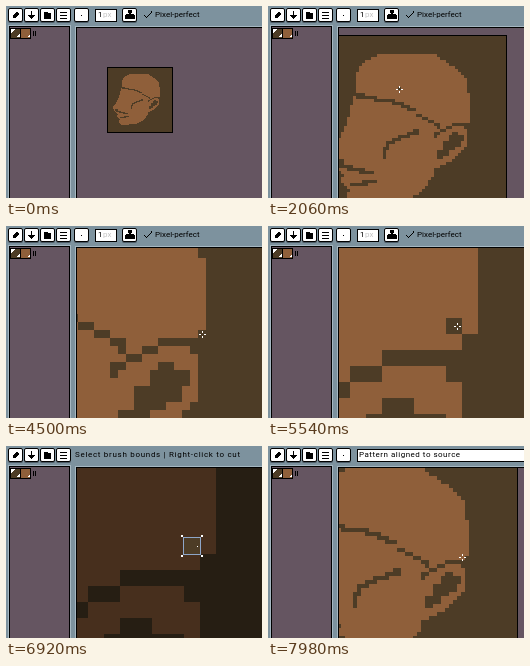
Write an HTML page with a canvas that moves like this. It is 256 px wide and 192 px high and loops after 8 s.

```html
<!DOCTYPE html>
<html lang="en">
<head>
<meta charset="utf-8">
<title>Pixel editor</title>
<style>
  html, body { margin: 0; width: 100%; height: 100%; overflow: hidden; background: #7d929e; }
  #stage { position: absolute; left: 0; top: 0; width: 256px; height: 192px; overflow: hidden;
    background: #7d929e; font: 8px/10px Roboto, sans-serif; color: #000; }
  #stage *, #stage { box-sizing: border-box; }
  #stage div, #stage span, #stage svg, canvas { position: absolute; }
  canvas { left: 71px; top: 22px; image-rendering: pixelated; }
  .panel { top: 20px; height: 180px; background: #655561; border: 1px solid #000;
    box-shadow: 0 0 0 1px #a5b7c1; }
  .btn { top: 2px; width: 15px; height: 14px; background: #fff; border: 1px solid #000;
    border-radius: 2px; box-shadow: 0 1px #4b5a66; }
  .field { top: 3px; height: 13px; background: #fff; border: 1px solid #000; }
  #stage span { top: 4px; white-space: pre; }
  .bar { left: 0; top: 0; width: 256px; height: 18px; }
  .hint { left: 69px; letter-spacing: .7px; }
  .combo { left: 91px; letter-spacing: .5px; }
  svg { left: 0; top: 0; }
</style>
</head>
<body>
<div id="stage">
  <div class="btn" style="left:2px"></div>
  <div class="btn" style="left:18px"></div>
  <div class="btn" style="left:34px"></div>
  <div class="btn" style="left:50px"></div>
  <svg width="66" height="18" shape-rendering="crispEdges">
    <path d="M10 6h2v1h1v2h-1v1h-1v1h-1v1H7V9h1V8h1V7h1z"/>
    <path d="M25 5h1v4h3v1h-1v1h-1v1h-1v1h-1v-1h-1v-1h-1v-1h-1V9h3z"/>
    <path d="M38 6h4v1h3v6h-7z"/>
    <path d="M54 6h7v1h-7zM54 9h7v1h-7zM54 12h7v1h-7z"/>
  </svg>

  <div class="bar" data-bar="tool">
    <div class="btn" style="left:68px"></div>
    <div class="field" style="left:89px;width:22px"></div>
    <div class="btn" style="left:116px"></div>
    <svg width="150" height="18" shape-rendering="crispEdges">
      <path d="M75 9h1v1h-1z"/>
      <path d="M122 4h4v3h-1v1h3v1h1v4h-10V9h1V8h3V7h-1z"/>
      <path d="M145 5h1v2h-1v1h-1v1h-1v1h-1v1h-1v1h-1v-1h-1v-1h-1V9h1v1h1v1h1v-1h1V9h1V8h1V7h1z"/>
    </svg>
    <span style="left:92px">1</span>
    <span style="left:97px;color:#c5c5c5">px</span>
    <span style="left:149px">Pixel-perfect</span>
  </div>
  <div class="bar" data-bar="hint"><span class="hint">Select brush bounds | Right-click to cut</span></div>
  <div class="bar" data-bar="pattern">
    <div class="btn" style="left:68px"></div>
    <svg width="90" height="18"><path d="M75 9h1v1h-1z"/></svg>
    <div class="field" style="left:89px;width:170px"></div>
    <span class="combo">Pattern aligned to source</span>
  </div>

  <div class="panel" style="left:3px;width:61px"></div>
  <div class="panel" style="left:70px;top:21px;width:190px"></div>
  <svg width="40" height="40" shape-rendering="crispEdges">
    <path d="M4 22h21v11H4z"/>
    <path fill="#4d3c26" d="M5 23h9v9H5z"/>
    <path fill="#8f5f3a" d="M15 23h9v9h-9z"/>
    <path fill="#fff" d="M5 23h4v1H8v1H7v1H6v1H5zM11 31h3v-3h-1v1h-1v1h-1zM22 31h2v-2h-1v1h-1z"/>
    <path d="M27 25h1v5h-1zM29 25h1v5h-1z"/>
  </svg>
  <canvas id="view" width="185" height="170"></canvas>
</div>

<script>
const LOOP = 8000, SIZE = 64;
const DARK = '#4d3c26', SKIN = '#8f5f3a';
const ctx = document.getElementById('view').getContext('2d');
const bars = document.querySelectorAll('[data-bar]');

// start time, scale, sprite left, sprite top
const zooms = [
  [0, 1, 102, 62], [1410, 2, 71, 47], [2060, 3, 46, 30], [2450, 4, -7, -2],
  [2700, 6, -112, -61], [2900, 8, -216, -120], [5540, 16, -622, -340],
  [5600, 32, -1434, -780], [5750, 64, -3058, -1660], [6130, 32, -1434, -780],
  [6250, 16, -622, -340], [7580, 8, -216, -120], [7930, 6, -112, -61], [7980, 4, -7, -2]
];

// time, x, y
const moves = [
  [560, 244, 122], [1000, 92, 86], [1360, 133, 77], [1410, 133, 77], [1850, 131, 83],
  [2090, 131, 83], [2840, 188, 100], [3300, 195, 103], [3360, 195, 103], [3650, 190, 107],
  [4260, 188, 108], [4440, 188, 108], [4500, 196, 108], [4930, 196, 108], [5200, 189, 100],
  [7580, 189, 100], [7780, 192, 107], [7980, 194, 111]
];

const modes = [[0, 'tool'], [6400, 'hint'], [7310, 'pattern']];

// Sprite shapes, in sprite pixels
const head = 'M22 6H40L43 8L46 10L49 12L51 15V19H52V29H46V30H50V31H51V36L49 38L47 41L45 42L43 43' +
  'L40 44V46L38 49L34 53L28 56L14 57L11 54L12 51L9 49L10 46L6 42L5 39L8 35L10 31L12 26L13 21L14 20V13L15 11L18 8Z';
const marks = [
  'M14 19H17V20H21V21H27V22H30V23H32V24H34V26H36V27H38V28H40V29H42V31H44V30H46V29H52V30H46V31H44V32H42V33H41V34H40V32H42V31H41V30H40V29H38V28H36V27H34V25H31V24H29V23H26V22H20V21H14Z',
  'M35 31V33H32V34H29V35H27V36H25V38H24V41H23V37H24V35H26V34H28V33H31V32H33V31Z',
  'M46 32H48V33H50V35H49V37H47V38H45V40H43V41H41V38H43V35H45V33H46Z',
  'M7 41H10V43H13V44H17V45H20V46H15V45H11V44H8Z',
  'M12 49H16V48H21V49H18V50H12Z'
];

function makeSprite() {
  const art = document.createElement('canvas');
  art.width = art.height = SIZE;
  const c = art.getContext('2d');
  const outline = new Path2D(head);
  const lines = marks.map(d => new Path2D(d));
  for (let y = 0; y < SIZE; y++) {
    for (let x = 0; x < SIZE; x++) {
      const inside = p => c.isPointInPath(p, x + .5, y + .5);
      c.fillStyle = inside(outline) && !lines.some(inside) ? SKIN : DARK;
      c.fillRect(x, y, 1, 1);
    }
  }
  return art;
}

const sprite = makeSprite();
const latest = (list, t) => list.filter(k => k[0] <= t).pop();

function pointer(t) {
  const a = latest(moves, t);
  if (!a) return null;
  const b = moves[moves.indexOf(a) + 1] || a;
  const p = b === a ? 0 : (t - a[0]) / (b[0] - a[0]);
  return [1, 2].map(i => Math.round(a[i] + (b[i] - a[i]) * p));
}

function rect(color, x, y, w, h) {
  ctx.fillStyle = color;
  ctx.fillRect(x, y, w, h);
}

function crosshair(x, y) {
  for (const d of [-3, 2]) {
    rect('#fff', x + d, y, 2, 1);
    rect('#fff', x, y + d, 1, 2);
  }
}

function selection(x, y, s) {
  rect('#8ea6c8', x - 1, y - 1, s + 2, s + 2);
  rect(DARK, x, y, s, s);
  for (const cx of [x - 3, x + s + 1]) {
    for (const cy of [y - 3, y + s + 1]) rect('#fff', cx, cy, 2, 2);
  }
}

function draw(t) {
  const mode = latest(modes, t)[1];
  for (const bar of bars) bar.hidden = bar.dataset.bar !== mode;

  const [, s, x0, y0] = latest(zooms, t);
  const cell = (col, row) => rect(DARK, x0 + col * s, y0 + row * s, s, s);
  const selecting = t >= 6920 && t < 7310;
  ctx.setTransform(1, 0, 0, 1, -71, -22);
  ctx.imageSmoothingEnabled = false;
  rect('#655561', 71, 22, 185, 170);
  rect('#000', x0 - 1, y0 - 1, SIZE * s + 2, SIZE * s + 2);
  ctx.drawImage(sprite, x0, y0, SIZE * s, SIZE * s);
  if (t >= 4500) cell(51, 28);

  const at = pointer(t);
  if (!at) return;
  const [x, y] = at;
  const col = Math.floor((x - x0) / s), row = Math.floor((y - y0) / s);
  if (selecting) {
    rect('rgba(0,0,0,.5)', 71, 22, 185, 170);
    selection(x0 + col * s, y0 + row * s, s);
    rect('#fff', x + 2, y, 1, 1);
    return;
  }
  const onSprite = Math.min(col, row) >= 0 && Math.max(col, row) < SIZE;
  if (mode === 'tool' && onSprite) cell(col, row);
  crosshair(x, y);
}

function tick() {
  draw(performance.now() % LOOP);
  requestAnimationFrame(tick);
}
tick();
</script>
</body>
</html>
```
